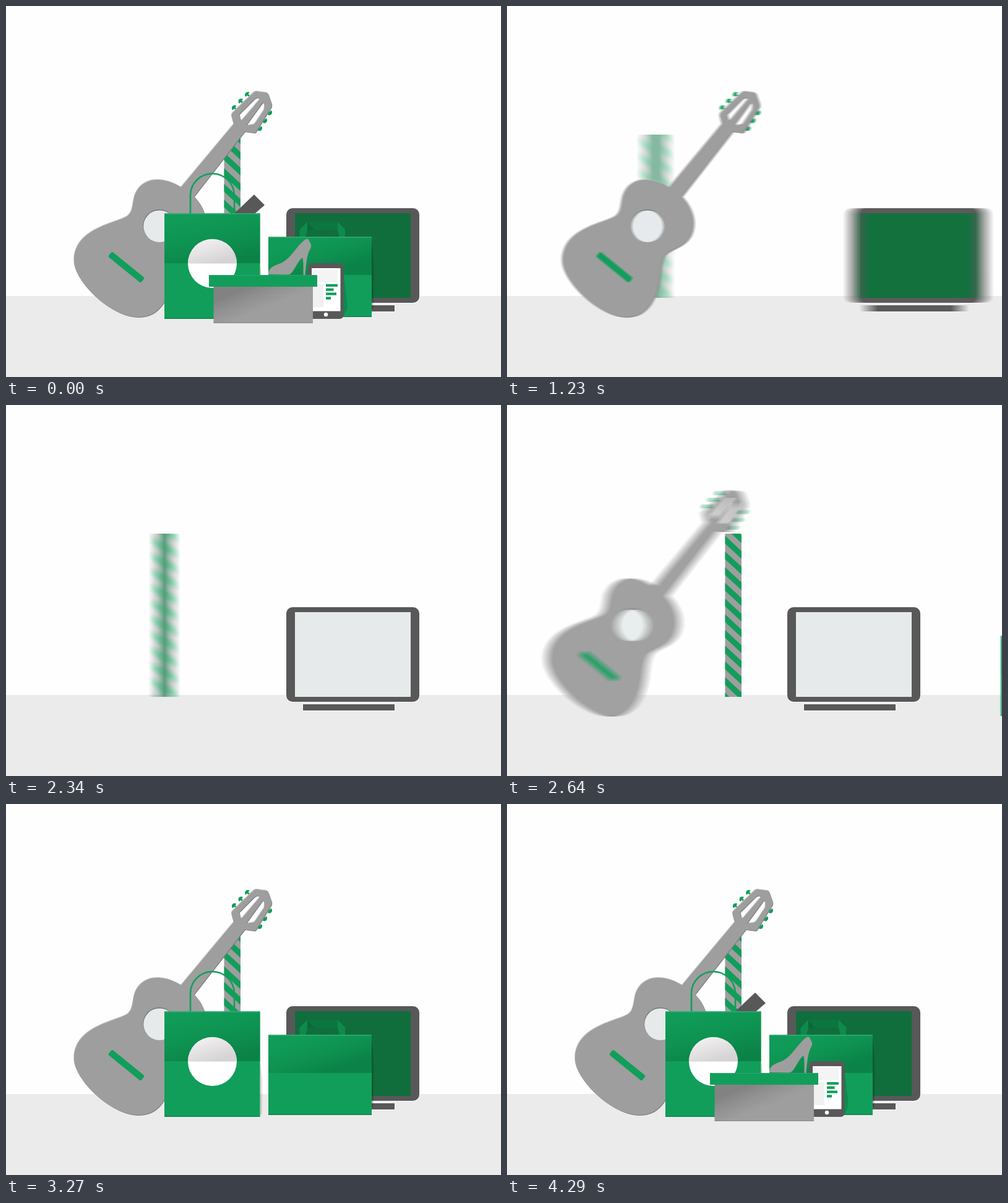
Write an HTML page with a canvas that moves like this. It is 800x600 px and loops after 4.5 s.

```html
<!DOCTYPE html>
<html lang="en">
<head>
<meta charset="utf-8">
<title>Gifts on a shelf</title>
<style>
html, body { margin: 0; width: 100%; height: 100%; overflow: hidden; background: #fefefe; }
canvas { display: block; }
</style>
</head>
<body>
<canvas id="stage" width="800" height="600"></canvas>
<script>
const W = 800, H = 600, LOOP = 4500, STEP = 30;
const GREEN = '#119e5a', GREY = '#9e9e9e', DARK = '#595858', PALE = '#e6eaeb';
const EXIT_TIME = 360, EXIT_RATE = 0.01925, ENTER_TIME = 310, SHUTTER = 15, MAX_SAMPLES = 12;

const context = canvas => canvas.getContext('2d', { willReadFrequently: true });
const scratch = (width, height) => context(Object.assign(document.createElement('canvas'), { width, height }));
const stage = context(document.getElementById('stage'));
const sprite = scratch(340, 380);
const smear = scratch(420, 380);

const clamp = v => Math.max(0, Math.min(1, v));
const progress = (t, start, time) => clamp((t - start) / time);
const smooth = p => p * p * (3 - 2 * p);
const outBack = (p, s) => 1 + (s + 1) * (p - 1) ** 3 + s * (p - 1) ** 2;

function rect(c, x, y, w, h, fill) {
  c.fillStyle = fill;
  c.fillRect(x, y, w, h);
}
function round(c, x, y, w, h, r, fill) {
  c.beginPath();
  c.roundRect(x, y, w, h, r);
  c.fillStyle = fill;
  c.fill();
}
function disc(c, x, y, r, fill, from = 0, to = Math.PI * 2) {
  c.beginPath();
  c.arc(x, y, r, from, to);
  c.fillStyle = fill;
  c.fill();
}
function shape(c, d, fill) {
  c.fillStyle = fill;
  c.fill(new Path2D(d), 'evenodd');
}
function blend(c, x0, y0, x1, y1, ...colors) {
  const g = c.createLinearGradient(x0, y0, x1, y1);
  colors.forEach((color, i) => g.addColorStop(i / (colors.length - 1), color));
  return g;
}

function drawMonitor(c, t) {
  round(c, 452, 326, 217, 155, 11, 'rgba(255,255,255,.75)');
  round(c, 453, 327, 215, 153, 10, DARK);
  rect(c, 479, 483, 150, 12, 'rgba(255,255,255,.6)');
  rect(c, 480, 484, 148, 10, DARK);
  rect(c, 467, 335, 187, 137, PALE);
  c.save();
  c.globalAlpha = t < 1700 ? 1 : progress(t, 2700, 240);
  rect(c, 467, 335, 187, 137, '#106e3c');
  c.restore();
}

function drawTie(c) {
  c.save();
  c.beginPath();
  c.rect(352.5, 208, 26.5, 264);
  c.clip();
  rect(c, 352, 208, 28, 264, GREY);
  for (let y = 185.7; y < 480; y += 25.4) {
    shape(c, `M352 ${y}l28 26v12.6l-28 -26z`, GREEN);
  }
  c.restore();
}

const GUITAR = 'M283 293C270 285 257 281 245 281C224 281 211 294 207 310C204 323 205 333 196 340' +
  'C176 352 110 360 110 412C110 446 170 503 214 503C250 503 264 470 268 440C271 418 272 408 278 401' +
  'C290 390 323 388 323 350C323 333 314 318 304 308L386 203L401 205Q404 205 405 202L429 163Q430 160 429 157' +
  'L424 143Q423 140 420 140L405 138Q402 138 400 140L366 173Q364 175 364.5 178L368 191Z' +
  'M402 150Q408 146 410 151L382 184L379 185L377 175Z' +
  'M415 156Q419 157 417 168L403 189Q401 192 398 192L388 193Z';

function drawGuitar(c) {
  const tilt = -Math.PI * 50 / 180;
  const peg = (x, y, side) => {
    c.save();
    c.translate(x, y);
    c.rotate(tilt + side * Math.PI / 2);
    disc(c, 0, 0, 4.6, GREEN, -Math.PI / 2, Math.PI / 2);
    rect(c, -4, -1.5, 4.5, 3, GREEN);
    c.restore();
  };
  for (let i = 0; i < 3; i++) {
    peg(369.5 + i * 10.6, 165 - i * 10.7, -1);
    peg(409.5 + i * 8, 197.5 - i * 12.7, 1);
  }
  for (const [x, y, fill] of [[-.7, -.9, '#c6c6c6'], [.8, 1.1, '#7b7b7b'], [0, 0, GREY]]) {
    c.save();
    c.translate(x, y);
    shape(c, GUITAR, fill);
    c.restore();
  }
  disc(c, 247.7, 355.2, 26.3, '#747474');
  disc(c, 248, 356.2, 25.8, PALE);
  c.save();
  c.translate(194.5, 422.5);
  c.rotate(Math.atan2(42, 52));
  round(c, -34, -5.3, 68, 10.6, 2.5, GREEN);
  c.restore();
}

function drawStick(c, t) {
  const hidden = t < 1700 ? progress(t, 560, 210) ** 2 : (1 - progress(t, 4030, 255)) ** 2;
  if (hidden === 1) return;
  c.save();
  c.translate(-36 * hidden, 34 * hidden);
  shape(c, 'M401 305L418 322L380 355L360 344Z', DARK);
  c.restore();
}

function drawPanel(c, x, y, w, h, fold) {
  rect(c, x, y, w, h, GREEN);
  rect(c, x, y, w, fold - y, blend(c, x + w * .4, y, x + w * .52, fold, '#109c58', '#0e9351', '#0b8348'));
  rect(c, x, y, w, 1, '#4bb584');
  rect(c, x, y + h - 1.2, w, 1.2, '#0b7c45');
}
function drawSideShade(c, x, top, bottom, alpha) {
  const mid = (top + bottom) / 2;
  shape(c, `M${x} ${top}L${x + 5} ${mid}L${x + 3} ${bottom}H${x}Z`,
    blend(c, x, 0, x + 5, 0, `rgba(0,0,0,${alpha})`, 'rgba(0,0,0,0)'));
}

function drawTallBag(c) {
  drawSideShade(c, 410.5, 414, 503, .2);
  c.beginPath();
  c.moveTo(298, 336);
  c.lineTo(298, 306);
  c.arc(333.5, 306.5, 35.5, Math.PI, 0);
  c.lineTo(369, 336);
  c.strokeStyle = GREEN;
  c.lineWidth = 2.6;
  c.stroke();
  drawPanel(c, 256, 335.5, 154.5, 170.5, 416);
  disc(c, 333.5, 416.5, 39.5, '#fff');
  disc(c, 333.5, 416.5, 39.5, blend(c, 326, 377, 338, 416, '#f1eff0', '#e4e1e2', '#d6d3d4'), Math.PI, 0);
}

function drawWideBag(c) {
  drawSideShade(c, 591, 380, 490, .25);
  shape(c, 'M487 349H536V362H487Z', '#0c7641');
  shape(c, 'M487 349L498 362H487Z', '#0a6839');
  shape(c, 'M474.5 374V362L487 349V362L484 374ZM548 374V361L536 349V362L539 374Z', '#0e8a4c');
  drawPanel(c, 424, 373.5, 167, 129.5, 435);
}

function drawTablet(c, t) {
  shape(c, 'M545 425L552 487L545 503Z', 'rgba(0,70,35,.22)');
  round(c, 488.5, 416, 57, 90, 6, DARK);
  rect(c, 494, 424, 46.5, 69.5, '#fff');
  rect(c, 496, 426, 40, 21, '#f4f4f5');
  disc(c, 517, 499, 3.2, '#fff');
  const shown = t < 1700 ? 1 : progress(t, 4040, 250);
  c.save();
  c.globalAlpha = shown;
  rect(c, 496, 450, 17, 37, '#f1f1f2');
  c.restore();
  [19, 12.5, 17, 8].forEach((w, i) => {
    rect(c, 517, 449.7 + i * 6.9, w * smooth(clamp(shown * 1.6 - i * .2)), 4.2, GREEN);
  });
}

function drawShoeBox(c, t) {
  const lift = t < 1700 ? 1 : outBack(progress(t, 3750, 290), 3);
  if (lift > 0) {
    c.save();
    c.translate(0, 62 * (1 - lift));
    shape(c, 'M424 434C424 423 433 420 444 416C460 409 468 390 483 378Q487 375 489 378L493 386Q494 389 491 394' +
      'C486 404 485 418 483.5 435H480.5C480.5 422 481 412 479 407C472 412 466 427 461 432Q459 434.5 455 434.5Z', GREY);
    c.restore();
  }
  rect(c, 335.5, 454, 160.5, 59, blend(c, 392, 454, 416, 513, '#828282', '#929292', GREY, GREY));
  rect(c, 335.5, 512, 160.5, 1, '#868686');
  rect(c, 328, 435, 175, 19, GREEN);
  rect(c, 328, 435, 175, .8, '#2fac70');
}

// box: bounds at rest; out/into: travel when leaving and arriving; gone/come: when hidden and when arriving
const items = [
  { draw: drawMonitor, box: [451, 325, 220, 172], out: 347, gone: 1293, into: 347, come: 1880 },
  { draw: drawTie, box: [351, 207, 30, 267], out: -379, gone: 1288, into: -379, come: 2140 },
  { draw: drawGuitar, box: [106, 134, 330, 373], out: -432, gone: 1388, into: -432, come: 2392 },
  { draw: drawStick, box: [320, 300, 100, 90], out: 0, gone: 800, into: 0, come: 4000 },
  { draw: drawTallBag, box: [255, 269, 163, 240], out: -412, gone: 979, into: -415, come: 2930 },
  { draw: drawWideBag, box: [423, 348, 175, 157], out: -597, gone: 1153, into: 376, come: 2629 },
  { draw: drawTablet, box: [487, 415, 67, 93], out: 312, gone: 971, into: 312, come: 3570 },
  { draw: drawShoeBox, box: [326, 355, 179, 160], out: 472, gone: 900, into: 472, come: 3275 }
];

function offsetAt(item, t) {
  if (t < 1700) {
    const left = item.gone - t;
    return left > EXIT_TIME ? 0 : item.out * Math.exp(-EXIT_RATE * left);
  }
  return item.into * (1 - smooth(progress(t, item.come, ENTER_TIME)));
}

function drawItem(item, t) {
  if (t >= item.gone + SHUTTER && t < item.come) return;
  const from = offsetAt(item, t - SHUTTER / 2), to = offsetAt(item, t + SHUTTER / 2);
  const blur = Math.abs(to - from);
  if (blur < 1) {
    stage.save();
    stage.translate(offsetAt(item, t), 0);
    item.draw(stage, t);
    stage.restore();
    return;
  }
  const [x, y, w, h] = item.box;
  const left = Math.floor(Math.min(from, to));
  const width = Math.ceil(w + blur + 2);
  sprite.clearRect(0, 0, w, h);
  sprite.save();
  sprite.translate(-x, -y);
  item.draw(sprite, t);
  sprite.restore();
  smear.clearRect(0, 0, width, h);
  // Running average of shifted copies: each copy replaces 1/n of the result.
  const samples = Math.min(MAX_SAMPLES, Math.ceil(blur / 2) + 1);
  for (let n = 1; n <= samples; n++) {
    const shift = from + (to - from) * (n - .5) / samples - left;
    smear.globalAlpha = 1 / n;
    smear.globalCompositeOperation = 'destination-out';
    smear.fillRect(0, 0, width, h);
    smear.globalCompositeOperation = 'lighter';
    smear.drawImage(sprite.canvas, 0, 0, w, h, shift, 0, w, h);
  }
  smear.globalCompositeOperation = 'source-over';
  smear.globalAlpha = 1;
  stage.drawImage(smear.canvas, 0, 0, width, h, x + left, y, width, h);
}

const begin = performance.now();
let shownTime = -1;
function frame() {
  const t = Math.floor((performance.now() - begin) % LOOP / STEP) * STEP;
  if (t !== shownTime) {
    shownTime = t;
    rect(stage, 0, 0, W, H, '#fefefe');
    rect(stage, 0, 469, W, H - 469, '#ebebeb');
    for (const item of items) drawItem(item, t);
  }
  requestAnimationFrame(frame);
}
frame();
</script>
</body>
</html>
```
